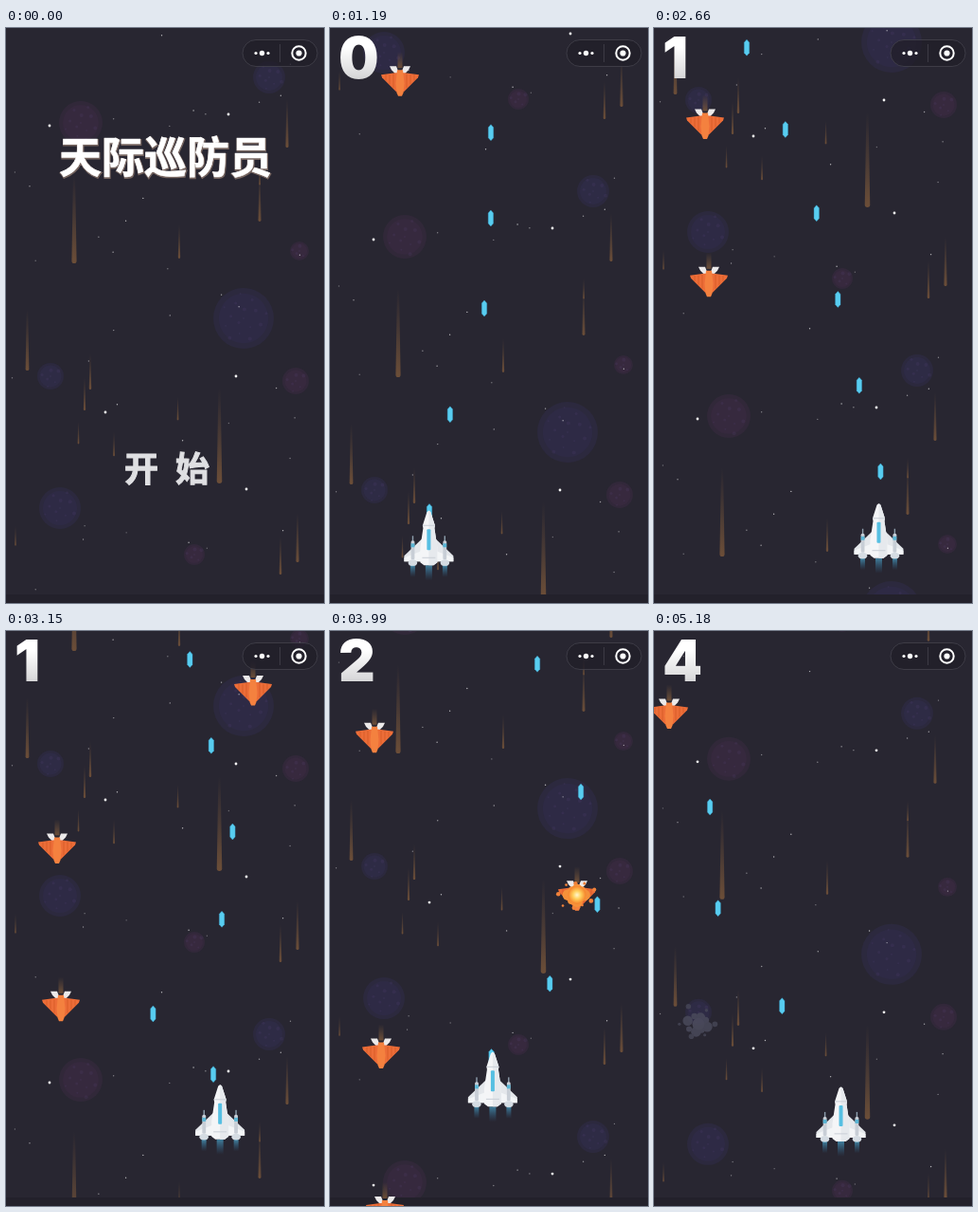
These frames come from a looping animation (336x606 px, 5250 ms). An HTML page:

```html
<!DOCTYPE html>
<html lang="zh">
<head>
<meta charset="utf-8">
<title>天际巡防员</title>
<style>
html, body { margin: 0; width: 100%; height: 100%; overflow: hidden; background: #282631; }
svg { display: block; width: 100vw; height: 100vh; }
.zh { font-family: 'Noto Sans CJK SC', 'Noto Sans CJK', sans-serif; }
.score { font: 900 60px Inter, sans-serif; }
</style>
</head>
<body>
<svg viewBox="0 0 336 606" xmlns="http://www.w3.org/2000/svg">
  <defs>
    <linearGradient id="tail" x2="0" y2="1">
      <stop offset="0" stop-color="#75553a" stop-opacity="0"/>
      <stop offset=".5" stop-color="#75553a" stop-opacity=".42"/>
      <stop offset="1" stop-color="#785539" stop-opacity=".85"/>
    </linearGradient>
    <linearGradient id="jet" x2="0" y2="1">
      <stop offset="0" stop-color="#4ba6cc" stop-opacity=".7"/>
      <stop offset="1" stop-color="#2f6f9c" stop-opacity="0"/>
    </linearGradient>
    <linearGradient id="digit" x2="0" y2="1">
      <stop offset=".35" stop-color="#fff"/>
      <stop offset="1" stop-color="#c4c4c6"/>
    </linearGradient>
    <radialGradient id="fire">
      <stop offset="0" stop-color="#fff6cf"/>
      <stop offset=".45" stop-color="#ffd05c"/>
      <stop offset="1" stop-color="#f5822c"/>
    </radialGradient>
    <g id="tile"></g>
    <path id="bullet" d="M0-8.5 2.7-5.5V5.5L0 8.5-2.7 5.5V-5.5Z" fill="#58cdf0" stroke="#3a9fcb" stroke-width=".4"/>
    <g id="wing">
      <path d="M5-2 26 18V24H8Z" fill="#e4e7eb"/>
      <path d="M8 13 26 20V24H8Z" fill="#f3f5f7"/>
      <rect x="16.2" y="-3" width="1.4" height="9" fill="#8fa0ae"/>
      <rect x="15" y="2" width="3.8" height="20" rx="1.5" fill="#c8ced6"/>
      <rect x="15" y="5" width="3.8" height="4" fill="#58b4d4"/>
      <ellipse cx="17" cy="25.5" rx="4.8" ry="3.5" fill="#d5dce3"/>
      <rect x="14.5" y="28.5" width="5" height="12" fill="url(#jet)"/>
    </g>
    <g id="hero">
      <rect x="-3.5" y="28" width="7" height="16" fill="url(#jet)"/>
      <use href="#wing"/>
      <use href="#wing" transform="scale(-1 1)"/>
      <path d="M-2-28Q0-31 2-28L6.5-14 6-11 9 9V25L5 28H-5L-9 25V9L-6-11-6.5-14Z" fill="#f4f5f7"/>
      <path d="M0-29.5Q1-29.5 2-28L6.5-14 6-11 9 9V25L5 28H0Z" fill="#e6e9ed"/>
      <path d="M-6.5-14H6.5M-7 20H7" stroke="#c9ced6"/>
      <rect x="-2" y="-10" width="4" height="22" rx="1" fill="#56bfe2"/>
    </g>
    <g id="foe">
      <rect x="-2.5" y="-30" width="5" height="17" fill="url(#tail)"/>
      <path d="M-11-15H-4L-2-10H2L4-15H11L9-11 5-7H-5L-9-11Z" fill="#eceaea"/>
      <path d="M-20-6-5-8H5L20-6 19-3 4 12H-4L-19-3Z" fill="#ec6d38"/>
      <path d="M-15-6V0M-11-6V4M-7-7V8M7-7V8M11-6V4M15-6V0" stroke="#c9501f" opacity=".55"/>
      <path d="M-3-11H3L4.5 3 3.5 13 2 16.5H-2L-3.5 13-4.5 3Z" fill="#f4813f"/>
    </g>
  </defs>
  <rect width="336" height="606" fill="#282631"/>
  <use id="bgA" href="#tile"/>
  <use id="bgB" href="#tile"/>
  <rect y="597" width="336" height="9" fill="#23212b"/>
  <g id="menu">
    <g class="zh" font-weight="700" font-size="45">
      <text x="56.5" y="154" fill="#75645f" stroke="#75645f" stroke-width="2">天际巡防员</text>
      <text x="56" y="153" fill="#fff" stroke="#fff" stroke-width=".6">天际巡防员</text>
    </g>
    <g class="zh" font-weight="900" font-size="36" fill="#dfdfe2" stroke="#dfdfe2">
      <text x="125" y="477.5">开</text><text x="179" y="477.5">始</text>
    </g>
  </g>
  <g id="game">
    <g id="shots"></g>
    <use id="ship" href="#hero"/>
    <g id="foes"></g>
    <text class="score" x="9" y="53" fill="url(#digit)" id="score"></text>
  </g>
  <rect x="250" y="12.5" width="79" height="28" rx="14" fill="#201e28" fill-opacity=".75" stroke="#45434d" stroke-width=".8"/>
  <path d="M289.5 17V36" stroke="#45434d" stroke-width=".8"/>
  <g fill="#fff">
    <circle cx="264" cy="26.5" r="1.6"/><circle cx="270.5" cy="26.5" r="2.7"/><circle cx="277" cy="26.5" r="1.6"/>
    <circle cx="309.5" cy="26.5" r="3.1"/>
    <circle cx="309.5" cy="26.5" r="7.2" fill="none" stroke="#fff" stroke-width="2"/>
  </g>
</svg>
<script>
const LOOP = 5250, STEP = 70, TILE = 600, PLAY_AT = 140;
const $ = id => document.getElementById(id);

let seed = 7;
const rand = (lo, hi) => {
  seed = seed * 16807 % 2147483647;
  return lo + (hi - lo) * seed / 2147483647;
};
const times = (n, f) => Array.from({ length: n }, (_, i) => f(i));
const circle = (x, y, r, fill, o = 1) => `<circle cx="${x}" cy="${y}" r="${r}" fill="${fill}" opacity="${o}"/>`;

// Scenery at zero scroll: only the prominent pieces are placed by hand
const violet = [[79, 100, 23], [310, 235, 10], [306, 372, 14], [199, 555, 11]];
const indigo = [[278, 52, 17], [251, 306, 32], [47, 367, 14], [57, 506, 22]];
const comets = [ // x, lower end, length
  [72, 248, 93], [225.5, 480, 100], [22.5, 361, 64], [83, 403, 35], [89, 381, 38],
  [268, 204, 49], [297, 126, 51], [183, 243, 36], [308, 563, 52], [290, 576, 40]
];
const brightStars = [[46, 103], [235, 91], [105, 405], [243, 367], [254, 486]];

function planet([x, y, r], fill) {
  const specks = times(Math.round(r / 2), i => {
    const a = i * 2.4, d = r * Math.sqrt(2 * i / r) * .85;
    return circle(x + d * Math.cos(a), y + d * Math.sin(a), 1 + i % 3 * .5, '#6b5590', .12);
  });
  return circle(x, y, r, fill, .55) + circle(x, y, r * .82, fill, .65) + specks.join('');
}

function comet([x, end, len]) {
  const h = .25 + len * .025;
  return `<path d="M${x - h * .4} ${end - len}H${x + h * .4}L${x + h} ${end - h}A${h} ${h} 0 0 1 ${x - h} ${end - h}Z" fill="url(#tail)"/>`;
}

$('tile').innerHTML = [
  ...violet.map(p => planet(p, '#3a2a41')),
  ...indigo.map(p => planet(p, '#302c49')),
  ...comets.map(comet),
  ...times(5, () => comet([rand(10, 326), rand(30, 590), rand(18, 28)])),
  ...times(36, () => circle(rand(6, 330), rand(6, 594), .7, '#fff', rand(.3, .7))),
  ...brightStars.map(([x, y]) => circle(x, y, 1.4, '#fff', .95))
].join('');

// Piecewise linear lookup; each key is [position, ...values]
function track(keys, p) {
  let i = 1;
  while (i < keys.length - 1 && p > keys[i][0]) i++;
  const a = keys[i - 1], b = keys[i];
  const u = Math.max(0, (p - a[0]) / (b[0] - a[0]));
  return a.slice(1).map((v, j) => v + (b[j + 1] - v) * u);
}

// All play is driven by the scroll: foes move at twice its speed, shots at four times
const pace = [[262, 0], [1190, 120], [1960, 221], [2660, 309], [3640, 437], [4410, 534], [5250, 644]];
const flight = [ // scroll, x, y
  [50, 170, 499], [73, 163, 504], [96, 126, 526], [118, 105, 538], [141, 98, 541], [163, 57, 538],
  [221, 162, 528], [302, 243, 530], [321, 228, 532], [343, 154, 542], [366, 219, 515], [411, 265, 469],
  [437, 285, 502], [479, 170, 478], [501, 190, 429], [524, 148, 422], [534, 84, 446], [546, 52, 452],
  [591, 66, 485], [635, 198, 510]
];
const FIRE_AT = 27.8, FIRE_GAP = 22.55, MUZZLE = 20;
const FOE_AT = 92.4, FOE_GAP = 83.2, REACH = 20, BLAST = 66;

const shots = times(28, i => {
  const at = FIRE_AT + FIRE_GAP * i, [x, y] = track(flight, at);
  return { at, x, y: y - MUZZLE, end: Infinity };
});
const foes = [74, 58, 54, 261, 47, 154, 16].map((x, i) => ({ x, at: FOE_AT + FOE_GAP * i, end: Infinity }));

// A foe is destroyed by the first free shot that meets it on screen
for (const f of foes) {
  for (const s of shots) {
    const meet = (s.y + 4 * s.at + 2 * f.at) / 6;
    if (s.end === Infinity && Math.abs(s.x - f.x) < REACH && meet > s.at && meet > f.at) {
      s.end = f.end = meet;
      break;
    }
  }
}

const put = (id, x, y) => `<use href="#${id}" x="${x}" y="${y}"/>`;

const drawShot = (s, g) => g < s.at || g >= s.end ? '' : put('bullet', s.x, s.y - 4 * (g - s.at));

function ring(x, y, n, d, r, fill, turn) {
  return times(n, i => {
    const a = turn + i * 2 * Math.PI / n, k = d * (1 + .25 * Math.sin(i * 5));
    return circle(x + k * Math.cos(a), y + k * Math.sin(a), r * (1 + .3 * Math.cos(i * 3)), fill);
  }).join('');
}

function blast(x, y, p) {
  if (p < .75) {
    const r = 4 + 8 * Math.min(1, p * 2);
    return ring(x, y, 9, r * 1.45, 1.8, '#f0813a', .4) + ring(x, y, 8, r * .7, r * .42, '#f5913a', 0)
      + circle(x, y, r * .85, 'url(#fire)');
  }
  const d = 9 + 6 * (p - .75);
  return `<g opacity="${Math.min(.85, (1.1 - p) * 4)}">${ring(x, y - 5, 8, d, 4.2, '#4a4a5b', .3)}`
    + `${ring(x, y - 5, 6, d * 1.8, 2.2, '#454555', 0)}${circle(x, y - 5, 6.5, '#4d4d5e')}</g>`;
}

function drawFoe(f, g) {
  const y = 2 * (g - f.at), p = (g - f.end) / BLAST;
  if (y < -30 || y > 640) return '';
  return (p < .7 ? put('foe', f.x, y) : '') + (p >= 0 && p < 1 ? blast(f.x, y, p) : '');
}

function draw(ms) {
  const t = Math.floor(ms / STEP) * STEP;
  const playing = t >= PLAY_AT;
  const [g] = track(pace, t);
  const off = g % TILE;
  $('bgA').setAttribute('y', off);
  $('bgB').setAttribute('y', off - TILE);
  $('menu').style.display = playing ? 'none' : '';
  $('game').style.display = playing ? '' : 'none';
  if (!playing) return;
  const [x, y] = track(flight, g);
  $('ship').setAttribute('x', x);
  $('ship').setAttribute('y', y);
  $('shots').innerHTML = shots.map(s => drawShot(s, g)).join('');
  $('foes').innerHTML = foes.map(f => drawFoe(f, g)).join('');
  $('score').textContent = foes.filter(f => g >= f.end).length;
}

const start = performance.now();
function tick() {
  draw((performance.now() - start) % LOOP);
  requestAnimationFrame(tick);
}
tick();
</script>
</body>
</html>
```
